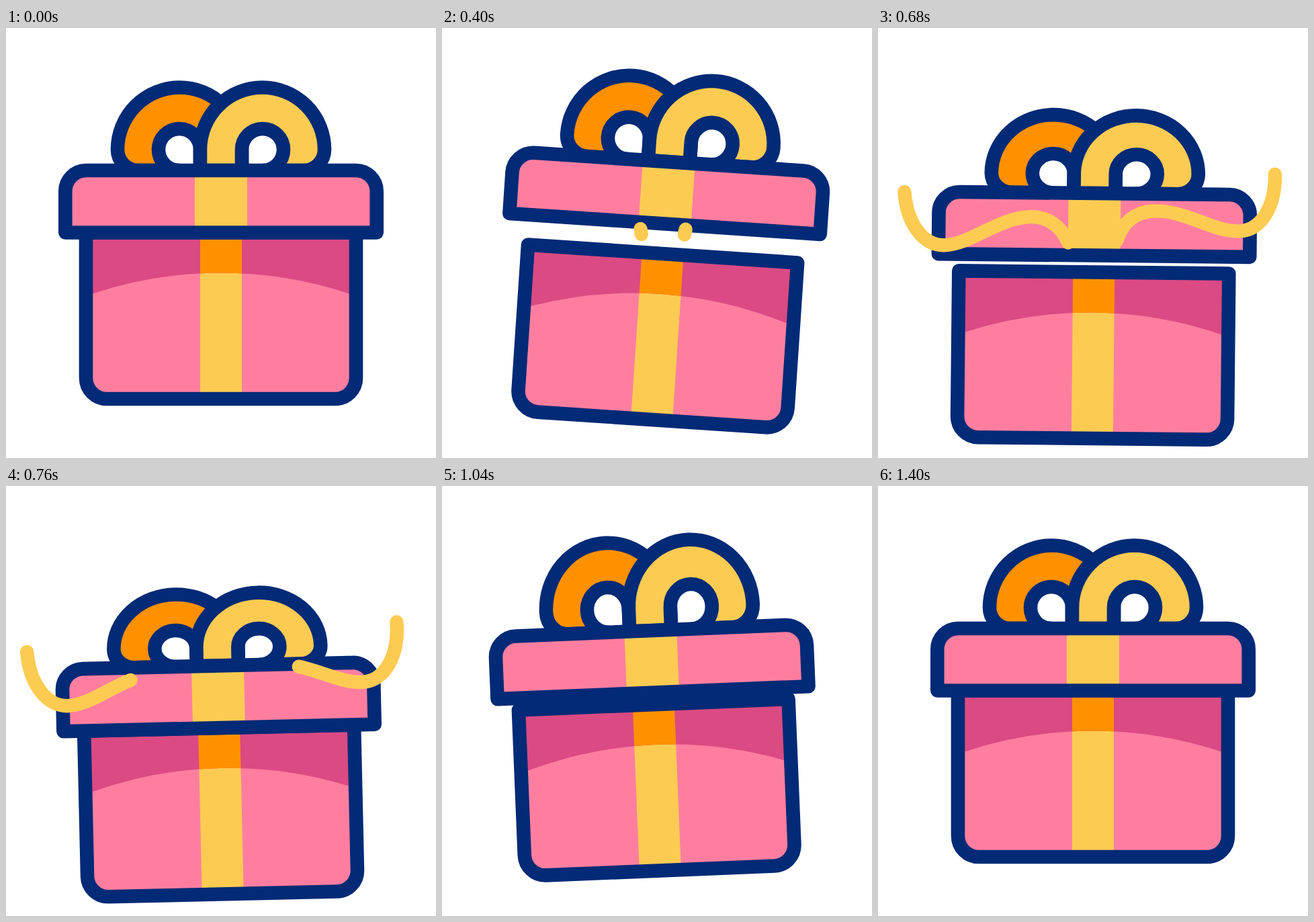
These frames come from a looping animation (640 by 640 pixels, 1640 ms). An HTML page:

```html
<!DOCTYPE html>
<html lang="en">
<head>
<meta charset="utf-8">
<title>Gift box</title>
<style>
  html, body { margin: 0; width: 100%; height: 100%; overflow: hidden; background: #fff; }
  svg { display: block; width: 100vw; height: 100vh; }
  .line { stroke: #032a76; stroke-width: 20.6; stroke-linejoin: round; }
  .pink { fill: #ff7ea0; }
  .shade { fill: #db4a83; }
  .gold { fill: #fdcb52; }
  .orange { fill: #ff9100; }
  .none { fill: none; }
  .streamer { fill: none; stroke: #fdcb52; stroke-width: 20.4; stroke-linecap: round; }
</style>
</head>
<body>
<svg viewBox="0 0 640 640">
  <defs>
    <path id="bodyShape" d="M119 304.5H521V521a31 31 0 0 1-31 31H150a31 31 0 0 1-31-31Z"/>
    <path id="lidShape" d="M88.3 304.5V243a31 31 0 0 1 31-31H520.7a31 31 0 0 1 31 31V304.5Z"/>
    <path id="ribbon" d="M-32-157C-38-195-62-215-92-215C-140-215-180-179-220-179C-252-179-276-215-276-264" pathLength="100"/>
    <clipPath id="shadow"><path d="M119 399V304H521V399L511 395.5A604 604 0 0 0 129 395.5Z"/></clipPath>
  </defs>
  <g id="box">
    <use href="#bodyShape" class="pink"/>
    <path class="gold" d="M289 304h62v248h-62z"/>
    <g clip-path="url(#shadow)">
      <path class="shade" d="M119 304h402v100h-402z"/>
      <path class="orange" d="M289 304h62v100h-62z"/>
    </g>
    <use href="#bodyShape" class="line none"/>
    <g id="lid">
      <path id="backLoop" class="line orange"/>
      <path id="frontLoop" class="line gold"/>
      <use href="#lidShape" class="pink"/>
      <path class="gold" d="M281 212h78v92h-78z"/>
      <use href="#lidShape" class="line none"/>
    </g>
  </g>
  <g id="streamers" class="streamer">
    <use href="#ribbon" transform="translate(7.5 0)"/>
    <use href="#ribbon" transform="translate(7.5 0) scale(-1 1)"/>
  </g>
</svg>
<script>
  const LOOP = 1640, STEP = 40, PIVOT = 433, TILT = -3.3;
  const $ = id => document.getElementById(id);

  // 0 to 1 between times a and b, soft at both ends
  function ease(t, a, b) {
    const u = Math.min(1, Math.max(0, (t - a) / (b - a)));
    return u * u * (3 - 2 * u);
  }

  // 0 at a, 1 at the peak, 0 again at b
  const pulse = (t, a, peak, b) => ease(t, a, peak) - ease(t, peak, b);

  const drop = t => 59 * pulse(t, 110, 668, 1285);
  const turn = t => 4.1 * pulse(t, 80, 460, 915) - 3.3 * pulse(t, 460, 915, 1267);
  const lift = t => -83 * pulse(t, 245, 540, 760) - 17.5 * pulse(t, 760, 1045, 1220);
  const stretch = t => 1 + 0.072 * pulse(t, 360, 560, 760)
    - 0.13 * pulse(t, 560, 760, 1040) + 0.077 * pulse(t, 760, 1040, 1320);
  const head = t => 100 * ease(t, 370, 698);
  const tail = t => 100 * ease(t, 640, 930);

  // Bow loop; side is 1 (right) or -1 (left), k stretches its height
  function loop(side, k) {
    const cw = side > 0 ? 1 : 0, r = 31 * k, x = 31 * side;
    return `M${320 - x} 212v${-r}a92.5 ${92.5 * k} 0 0 ${cw} ${185 * side} 0` +
      `a31 ${r} 0 0 ${cw} ${-x} ${r}H${320 + 2 * x}` +
      `a31 ${r} 0 1 ${1 - cw} ${-x} ${-r}v${r}z`;
  }

  function draw(t) {
    const y = drop(t), angle = turn(t), k = stretch(t);
    $('box').setAttribute('transform', `translate(0 ${y}) rotate(${angle} 320 ${PIVOT})`);
    $('lid').setAttribute('transform', `translate(0 ${lift(t)})`);
    $('backLoop').setAttribute('d', loop(-1, k));
    $('frontLoop').setAttribute('d', loop(1, k));

    const from = tail(t), len = head(t) - from, s = $('streamers');
    s.setAttribute('visibility', len > 0 ? 'visible' : 'hidden');
    s.setAttribute('transform', `translate(320 ${PIVOT + y}) rotate(${angle + TILT})`);
    s.setAttribute('stroke-dasharray', `${len} 300`);
    s.setAttribute('stroke-dashoffset', -from);
  }

  const start = performance.now();
  function tick() {
    const t = (performance.now() - start) % LOOP;
    draw(Math.floor(t / STEP) * STEP);
    requestAnimationFrame(tick);
  }
  tick();
</script>
</body>
</html>
```
